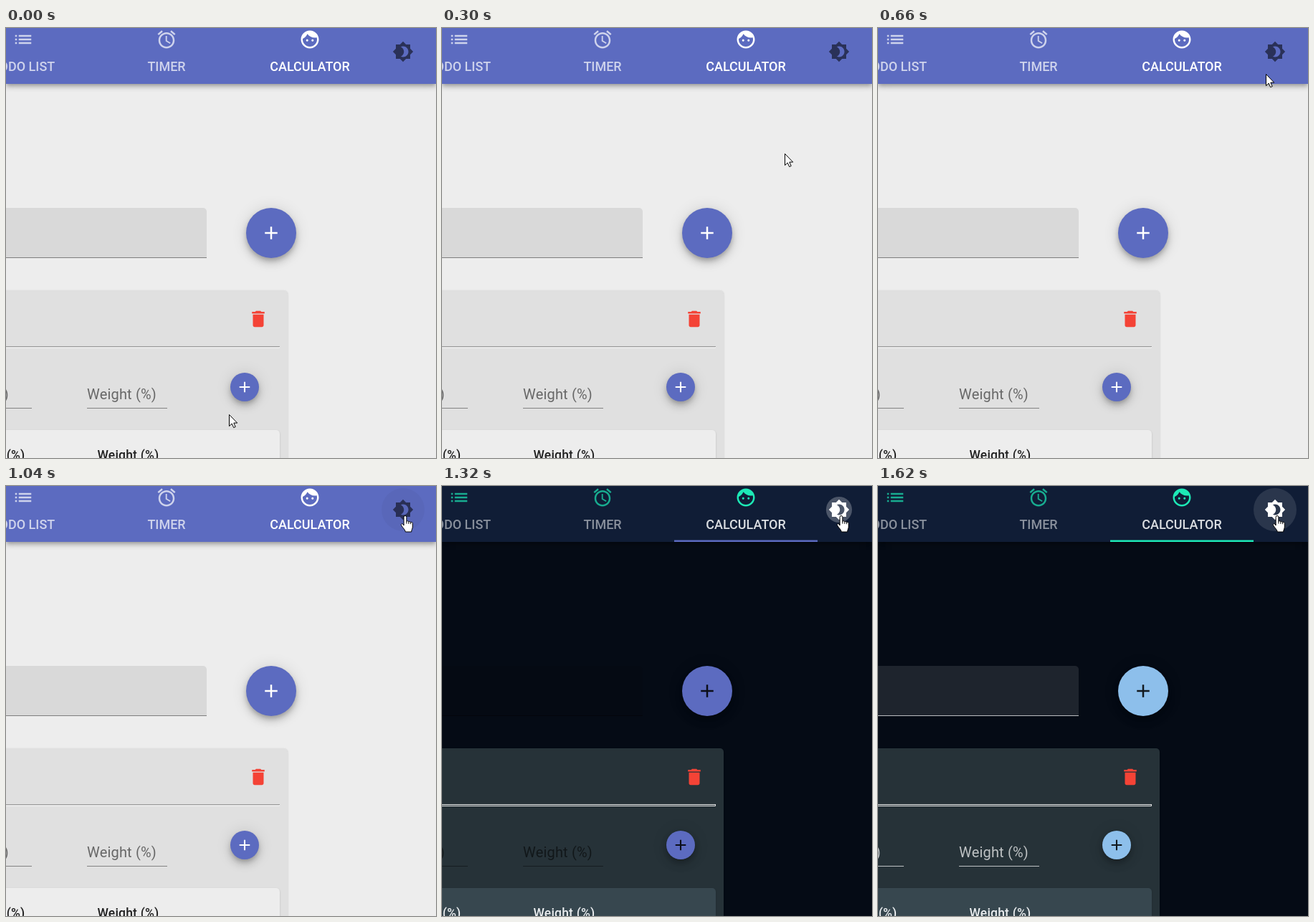
Recreate the animation shown at these times as an HTML page. Size 600 px wide and 600 px high, loop 2630 ms.

```html
<!DOCTYPE html>
<html lang="en">
<head>
<meta charset="utf-8">
<style>
html, body { margin: 0; width: 100%; height: 100%; overflow: hidden; }
body {
  --p: 0%;
  --page: #ededed; --bar: #5c6bc0; --card: #e0e0e0; --table: #ededed;
  --tab: #fff; --icon: #fff; --ink: rgba(0,0,0,.87); --plus: #fff; --toggle: rgba(0,0,0,.54);
  --hr1: #989898; --hr2: #eee;
  --accent: color-mix(in srgb, #5c6bc0, #8dbfeb var(--p));
  --label: color-mix(in srgb, rgba(0,0,0,.54), rgba(255,255,255,.7) var(--p));
  --line: color-mix(in srgb, rgba(0,0,0,.42), rgba(255,255,255,.7) var(--p));
  position: relative; background: var(--page);
}
body.dark {
  --page: #050b15; --bar: #101d36; --card: #263238; --table: #37474f;
  --tab: #dadde1; --icon: #1de9b6; --ink: #eceff1; --plus: rgba(0,0,0,.87); --toggle: #fff;
  --hr1: #eee; --hr2: #e4e4e4;
}
div, svg { position: absolute; }
svg { left: 0; top: 0; }
#bar { left: 0; top: 0; width: 600px; height: 78px; background: var(--bar);
  box-shadow: 0 2.5px 5px -1px rgba(0,0,0,.2), 0 5px 6px rgba(0,0,0,.14), 0 1px 12px rgba(0,0,0,.12); }
#field { left: 0; top: 251px; width: 280px; height: 70px; border-radius: 0 5px 0 0;
  background: color-mix(in srgb, rgba(0,0,0,.085), rgba(255,255,255,.1) var(--p)); }
.paper { left: -10px; border-radius: 5px;
  box-shadow: 0 2px 1px -1px rgba(0,0,0,.2), 0 1px 1px rgba(0,0,0,.14), 0 1px 3px rgba(0,0,0,.12); }
#card { top: 366px; width: 402.5px; height: 300px; background: var(--card); }
#table { top: 561px; width: 392px; height: 100px; background: var(--table); }
.fab { border-radius: 50%; background: var(--accent);
  box-shadow: 0 4px 6px -1px rgba(0,0,0,.2), 0 7px 12px rgba(0,0,0,.14), 0 1px 22px rgba(0,0,0,.12); }
#big { left: 335px; top: 251px; width: 70px; height: 70px; }
#small { left: 313px; top: 481px; width: 40px; height: 40px; }
text { font-family: Roboto, sans-serif; }
.tab { font-size: 18px; font-weight: 500; text-anchor: middle; fill: var(--tab); }
.label { font-size: 20px; letter-spacing: .00938em; fill: var(--label); }
.head { font-size: 17.5px; font-weight: 500; letter-spacing: .01071em; fill: var(--ink); }
.end { text-anchor: end; }
.icon { fill: var(--icon); }
.off { opacity: .7; }
.dark .tab.off { opacity: .6; }
.line { fill: var(--line); }
.plus { fill: var(--plus); }
.toggle { fill: var(--toggle); }
.cursor { fill: #fff; stroke: #000; stroke-width: 1; stroke-linejoin: round; }
</style>
</head>
<body>
<div id="bar"></div>
<div id="field"></div>
<div id="card" class="paper"></div>
<div id="table" class="paper"></div>
<div id="big" class="fab"></div>
<div id="small" class="fab"></div>
<svg width="600" height="600" viewBox="0 0 600 600">
  <defs>
    <path id="add" d="M19 13h-6v6h-2v-6H5v-2h6V5h2v6h6v2z"/>
  </defs>
  <path class="icon off" transform="translate(9 1) scale(1.25)" d="M3 13h2v-2H3v2zm0 4h2v-2H3v2zm0-8h2V7H3v2zm4 4h14v-2H7v2zm0 4h14v-2H7v2zM7 7v2h14V7H7z"/>
  <path class="icon off" transform="translate(209 1) scale(1.25)" d="M22 5.72l-4.6-3.86-1.29 1.53 4.6 3.86L22 5.72zM7.88 3.39L6.6 1.86 2 5.71l1.29 1.53 4.59-3.85zM12.5 8H11v6l4.75 2.85.75-1.23-4-2.37V8zM12 4c-4.97 0-9 4.03-9 9s4.02 9 9 9c4.97 0 9-4.03 9-9s-4.03-9-9-9zm0 16c-3.87 0-7-3.13-7-7s3.13-7 7-7 7 3.13 7 7-3.13 7-7 7z"/>
  <path class="icon" transform="translate(409 1) scale(1.25)" d="M9 11.75c-.69 0-1.25.56-1.25 1.25s.56 1.25 1.25 1.25 1.25-.56 1.25-1.25-.56-1.25-1.25-1.25zm6 0c-.69 0-1.25.56-1.25 1.25s.56 1.25 1.25 1.25 1.25-.56 1.25-1.25-.56-1.25-1.25-1.25zM12 2C6.48 2 2 6.48 2 12s4.48 10 10 10 10-4.48 10-10S17.52 2 12 2zm0 18c-4.41 0-8-3.59-8-8 0-.29.02-.58.05-.86 2.36-1.05 4.23-2.98 5.21-5.37C11.07 8.33 14.05 10 17.42 10c.78 0 1.53-.09 2.25-.26.21.71.33 1.47.33 2.26 0 4.41-3.59 8-8 8z"/>
  <text class="tab off" x="24" y="60">TODO LIST</text>
  <text class="tab off" x="224" y="60">TIMER</text>
  <text class="tab" x="424" y="60">CALCULATOR</text>
  <rect x="324" y="75.5" width="200" height="2.5" style="fill:color-mix(in srgb, #5c6bc0, #1de9b6 var(--p))"/>

  <circle id="hover" cx="554" cy="33" r="30"/>
  <path class="toggle" transform="translate(539 18) scale(1.25)" d="M20 8.69V4h-4.69L12 .69 8.69 4H4v4.69L.69 12 4 15.31V20h4.69L12 23.31 15.31 20H20v-4.69L23.31 12 20 8.69zM12 18c-.89 0-1.74-.2-2.5-.55C11.56 16.5 13 14.42 13 12s-1.44-4.5-3.5-5.45C10.26 6.2 11.11 6 12 6c3.31 0 6 2.69 6 6s-2.69 6-6 6z"/>
  <circle id="ripple" cx="554" cy="33"/>

  <rect class="line" y="320" width="280" height="1"/>
  <use href="#add" class="plus" transform="translate(355 271) scale(1.25)"/>
  <path fill="#f44336" transform="translate(337 391) scale(1.25)" d="M6 19c0 1.1.9 2 2 2h8c1.1 0 2-.9 2-2V7H6v12zM19 4h-3.5l-1-1h-5l-1 1H5v2h14V4z"/>
  <rect y="444" width="382" height="1" fill="var(--hr1)"/>
  <path d="M0 446.5H381.5V445" fill="none" stroke="var(--hr2)"/>

  <text class="label end" x="4" y="518">Grade (%)</text>
  <text class="label" x="113" y="518">Weight (%)</text>
  <rect class="line" y="530" width="36" height="1"/>
  <rect class="line" x="113" y="530" width="112" height="1"/>
  <use href="#add" class="plus" transform="translate(320.5 488.5) scale(1.0417)"/>
  <text class="head end" x="26.5" y="602">Grade (%)</text>
  <text class="head" x="127.5" y="602">Weight (%)</text>

  <path id="arrow" class="cursor" d="M.5 .5V16.6L4.2 13.1 6.7 18.6 9.2 17.5 6.8 12.1H11.7z"/>
  <path id="hand" class="cursor" d="M-1.9 2.4a1.9 1.9 0 0 1 3.8 0V8.6a1.6 1.6 0 0 1 3 .6a1.6 1.6 0 0 1 2.8 .8a1.5 1.5 0 0 1 2.6 1.3V16c0 2.6-1.6 4-1.6 7H.3c0-2.8-3.6-5.2-5.6-9c-1-2 1-3.2 2.2-1.6l1.2 1.6zM1.9 8.6v3M4.9 9.2v2.7M7.7 10v2.2"/>
</svg>
<script>
const LOOP = 2630, SWITCH = 1320, HAND_FROM = 690;
// time, x, y of the pointer tip
const route = [
  [0, 311, 539], [30, 309, 535], [120, 332, 465], [180, 375, 352], [240, 432, 236],
  [270, 457, 203], [300, 478, 175], [330, 495, 160], [390, 521, 140], [450, 535, 119],
  [540, 540, 92], [570, 540, 86], [660, 541, 64], [690, 546, 53], [750, 553, 31],
  [780, 555, 27], [840, 557, 41]
];
const $ = id => document.getElementById(id);
const clamp = v => Math.max(0, Math.min(1, v));
const span = (t, from, to) => clamp((t - from) / (to - from));

// cubic-bezier(.4, 0, .2, 1)
function ease(x) {
  let lo = 0, hi = 1, u;
  for (let i = 0; i < 20; i++) {
    u = (lo + hi) / 2;
    if (1.2 * u * (1 - u) ** 2 + .6 * u * u * (1 - u) + u ** 3 < x) lo = u; else hi = u;
  }
  return u * u * (3 - 2 * u);
}

function pointer(t) {
  const i = route.findIndex(k => k[0] > t);
  if (i < 0) return route.at(-1).slice(1);
  const [a, b] = [route[i - 1], route[i]], k = span(t, a[0], b[0]);
  return [1, 2].map(n => Math.round(a[n] + (b[n] - a[n]) * k));
}

function disc(el, white, opacity) {
  el.setAttribute('fill', white ? '#fff' : '#000');
  el.setAttribute('opacity', opacity);
}

function draw(now) {
  const t = now % LOOP, dark = t >= SWITCH;
  const p = t < SWITCH ? 0 : t >= 1560 ? 1 : ease(span(t, SWITCH, 1570));
  document.body.classList.toggle('dark', dark);
  document.body.style.setProperty('--p', p * 100 + '%');

  const [x, y] = pointer(Math.floor(t / 30) * 30), overButton = t >= HAND_FROM;
  $('arrow').style.display = overButton ? 'none' : '';
  $('hand').style.display = overButton ? '' : 'none';
  $(overButton ? 'hand' : 'arrow').setAttribute('transform', `translate(${x} ${y})`);

  disc($('hover'), dark, dark ? .11 * span(t, SWITCH, 1500) : t < 1040 ? 0 : .035 + .01 * span(t, 1040, 1130));
  $('ripple').setAttribute('r', Math.max(0, Math.min(30, 18 + (t - SWITCH) * .1)));
  disc($('ripple'), dark, dark ? .25 * (1 - span(t, SWITCH, 1560)) : .1 * span(t, 1230, 1290));
  requestAnimationFrame(tick);
}
const tick = () => draw(performance.now());
tick();
</script>
</body>
</html>
```
